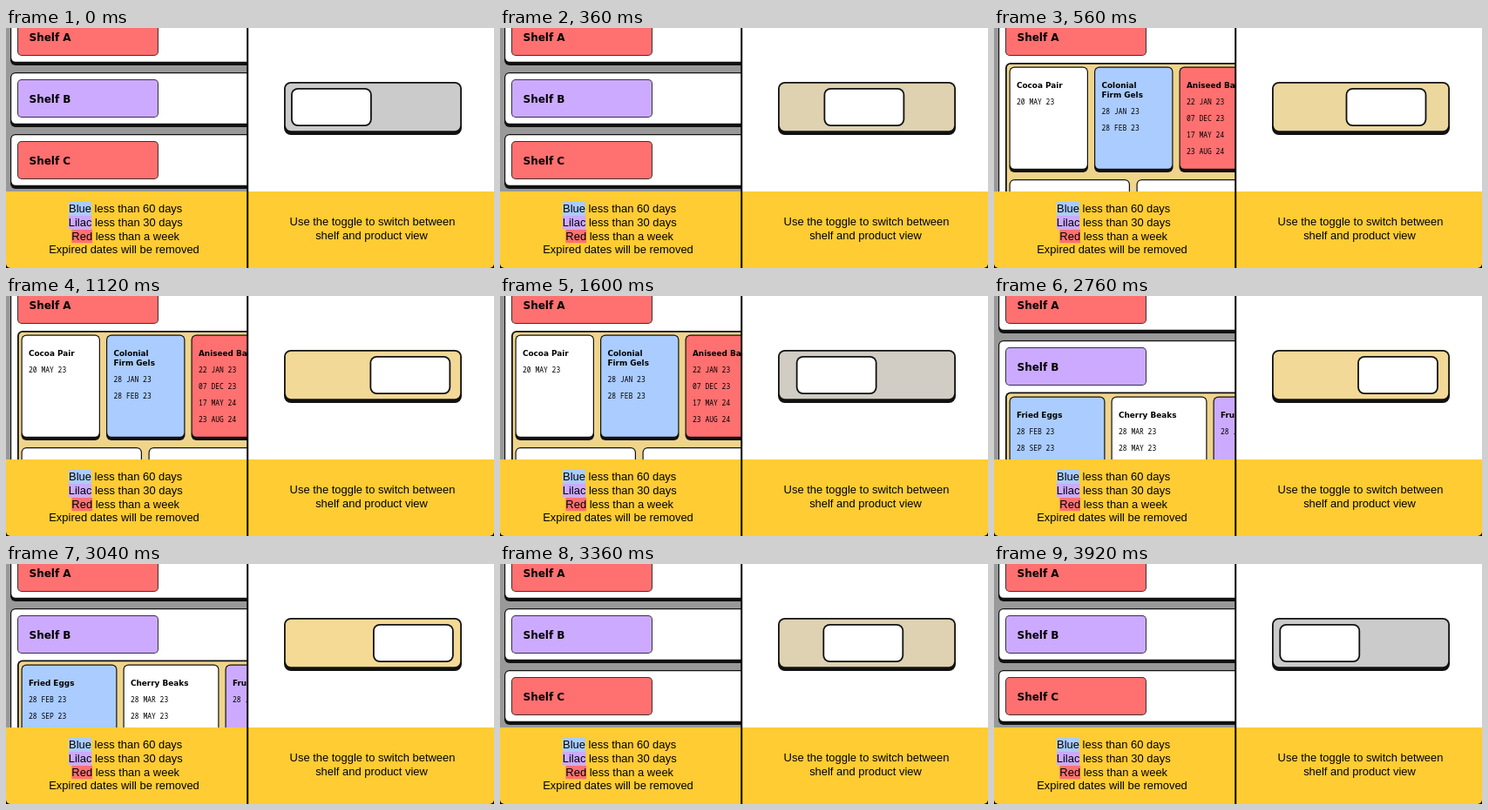
An HTML page with a canvas for the animation above (4000 ms loop, 560 px wide and 276 px high).

```html
<!DOCTYPE html>
<html lang="en">
<head>
<meta charset="utf-8">
<title>Shelf and product view</title>
<style>
  html, body { margin: 0; width: 100%; height: 100%; overflow: hidden; background: #fff; }
  canvas { display: block; }
</style>
</head>
<body>
<canvas id="stage" width="560" height="276"></canvas>
<script>
const ctx = document.getElementById('stage').getContext('2d');
const LOOP = 4000;
const RED = '#ff7070', BLUE = '#aaccff', LILAC = '#ccaaff', WHITE = '#fff';
const YELLOW = '#ffcc33', GOLD = '#efd48b';
const OFF = [203, 203, 203], ON = [244, 218, 149];

const HEADING = 'bold 12px "DejaVu Sans", sans-serif';
const PRODUCT = 'bold 8.9px "DejaVu Sans", sans-serif';
const DATE = '8px "Noto Sans Mono", monospace';
const CAPTION = '12.95px "Liberation Sans", Arial, sans-serif';

function rect(x, y, w, h, fill) {
  ctx.fillStyle = fill;
  ctx.fillRect(x, y, w, h);
}

function rounded(x, y, w, h, r, fill) {
  ctx.beginPath();
  ctx.roundRect(x, y, w, h, r);
  ctx.fillStyle = fill;
  ctx.fill();
}

// Outlined box with an optional heavier lower edge.
function box(x, y, w, h, r, fill, line = 1, drop = 0, edge = '#111') {
  rounded(x, y, w, h + drop, r, edge);
  rounded(x + line, y + line, w - 2 * line, h - 2 * line, r - line, fill);
}

function text(str, x, y, font, align = 'left') {
  ctx.font = font;
  ctx.textAlign = align;
  ctx.fillStyle = '#000';
  ctx.fillText(str, x, y);
}

function shelf(name, y, color, height = 60) {
  box(5, y, 300, height, 6, WHITE, 1.2, 3);
  box(13, y + 8, 162, 44, 5, color, 1, 0, '#333');
  text('Shelf ' + name, 26.5, y + 35, HEADING);
}

function product(x, y, w, fill, title, dates) {
  box(x, y, w, 118.5, 6, fill, 1.2, 3);
  title.forEach((line, i) => text(line, x + 8.5, y + 24 + i * 11, PRODUCT));
  const top = y + 43.5 + (title.length - 1) * 11;
  dates.forEach((date, i) => text(date, x + 8.5, top + i * 19, DATE));
}

const views = {
  closed() {
    shelf('A', -20, RED);
    shelf('B', 51, LILAC);
    shelf('C', 122, RED);
  },
  openA() {
    shelf('A', -20, RED, 300);
    box(13, 40, 300, 300, 6, GOLD, 1.8);
    product(17.5, 44.5, 90.5, WHITE, ['Cocoa Pair'], ['20 MAY 23']);
    product(115, 44.5, 90.5, BLUE, ['Colonial', 'Firm Gels'], ['28 JAN 23', '28 FEB 23']);
    product(212.5, 44.5, 90.5, RED, ['Aniseed Balls'],
      ['22 JAN 23', '07 DEC 23', '17 MAY 24', '23 AUG 24']);
    product(17.5, 174, 138.5, WHITE, [], []);
    product(163.5, 174, 138.5, WHITE, [], []);
  },
  openB() {
    shelf('A', -20, RED);
    shelf('B', 51, LILAC, 300);
    box(13, 110.5, 300, 300, 6, GOLD, 1.8);
    product(17.5, 115.5, 110, BLUE, ['Fried Eggs'], ['28 FEB 23', '28 SEP 23']);
    product(134.5, 115.5, 110, WHITE, ['Cherry Beaks'], ['28 MAR 23', '28 MAY 23']);
    product(251.5, 115.5, 110, LILAC, ['Fruit Mix'], ['28 JUL 23']);
  }
};

function viewAt(t) {
  if (t < 440 || t >= 3180) return views.closed;
  return t < 1900 ? views.openA : views.openB;
}

// cubic-bezier(.25, .1, .25, 1)
function ease(p) {
  if (p <= 0) return 0;
  if (p >= 1) return 1;
  let lo = 0, hi = 1;
  for (let i = 0; i < 20; i++) {
    const s = (lo + hi) / 2;
    if (0.75 * s * (1 - s) + s ** 3 < p) lo = s; else hi = s;
  }
  return 0.3 * lo * (1 - lo) ** 2 + 3 * lo * lo * (1 - lo) + lo ** 3;
}

function toggleAt(t) {
  const p = t % 2000;
  return p < 1070 ? ease((p - 120) / 860) : 1 - ease((p - 1070) / 930);
}

function drawToggle(k) {
  const color = OFF.map((c, i) => Math.round(c + (ON[i] - c) * k));
  box(319, 62, 204, 58, 8, `rgb(${color})`, 1.8, 3);
  box(327 + 94 * k, 69, 92.8, 44, 8, WHITE, 1.8);
}

// Centred caption whose first word is marked with a colour.
function keyLine(word, rest, y, color) {
  ctx.font = CAPTION;
  const left = 137.2 - ctx.measureText(word + rest).width / 2;
  rect(left, y - 12.2, ctx.measureText(word).width, 15.4, color);
  text(word + rest, left, y, CAPTION);
}

function drawCaptions() {
  rect(0, 188, 560, 88, '#000');
  rounded(0, 188, 560, 88, [0, 0, 5, 5], YELLOW);
  keyLine('Blue', ' less than 60 days', 212, BLUE);
  keyLine('Lilac', ' less than 30 days', 228, LILAC);
  keyLine('Red', ' less than a week', 244, RED);
  text('Expired dates will be removed', 135.5, 259, CAPTION, 'center');
  text('Use the toggle to switch between', 420.5, 227, CAPTION, 'center');
  text('shelf and product view', 419.5, 243, CAPTION, 'center');
}

function draw(t) {
  rect(0, 0, 560, 276, WHITE);
  ctx.save();
  ctx.beginPath();
  ctx.rect(0, 0, 277, 188);
  ctx.clip();
  rect(0, 0, 277, 188, '#999');
  viewAt(t)();
  ctx.restore();
  drawToggle(toggleAt(t));
  drawCaptions();
  rect(276.2, 0, 2, 276, '#000');
}

const start = performance.now();
function tick() {
  draw((performance.now() - start) % LOOP);
  requestAnimationFrame(tick);
}
tick();
</script>
</body>
</html>
```
